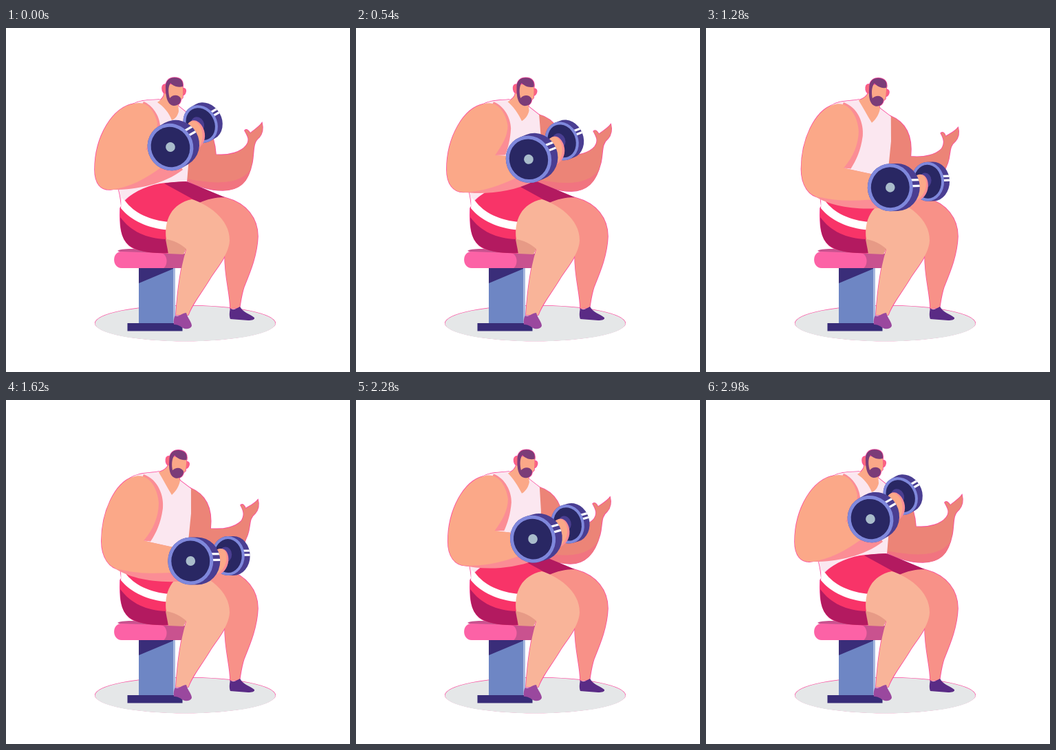
Animation, 500 px wide and 500 px high, one loop 3000 ms. Source, as an HTML page with a canvas:

```html
<!DOCTYPE html>
<html lang="en">
<head>
<meta charset="utf-8">
<title>Dumbbell curl</title>
<style>
html, body { margin: 0; width: 100%; height: 100%; overflow: hidden; background: #fff; }
canvas { display: block; width: 500px; height: 500px; }
</style>
</head>
<body>
<canvas id="stage" width="500" height="500"></canvas>
<script>
const ctx = document.getElementById('stage').getContext('2d');
const LOOP = 3000, STEP = 20;
const FRINGE = '#fb4a9d';

const SKIN = '#fba888', BLUSH = '#fb8d95', PINK = '#f83468', WINE = '#b31a60';
const SHIRT = '#fbe7f0', HAIR = '#7b3c78', EAR = '#f9667f';
const NAVY = '#292763', RIM = '#7f88dc', VIOLET = '#4a3e92';

// Still shapes
const still = {
  backLeg: 'M280 254 C298 245 310 244 320 247 C350 255 366 277 366 303 C365 330 355 354 346 376 C342 388 341 398 339.5 407 L326 408 C326 385 318 365 318 330 L290 290 Z',
  backShoe: 'M326 407 C330 412 336 407 340 405 C345 414 354 415 361 421 C362 424 357 425 352 425 L326 423 C324 418 325 412 326 407 Z',
  frontLeg: 'M270 249 C291 255 326 277 325 309 C324 329 306 349 296 365 C282 388 270 402 265 417 L247 417 C249 385 253 350 262 322 C252 315 243 311 233 308 C229 279 241 255 270 249 Z',
  thighShade: 'M232 307 C243 308 254 314 262 321 L258 329 L236 328 Z',
  frontShoe: 'M246 418 C251 421 256 414 262 414 C264 422 270 427 270 433 C268 438 261 438 257 436 C252 432 248 431 244 431 C243 426 244 421 246 418 Z',
  shorts: 'M173 251 C187 236 210 227 232 225 L262 223 L282 252 L240 300 L237 327 C212 328 190 325 179 316 C167 305 165 286 166 262 Z',
  shortsFar: 'M230 226 C242 224 252 223 264 223.5 L318 246 C304 246 292 249 281 254 Z',
  shortsLow: 'M166 275 C182 296 204 306 233 307 L236 327 C212 328 190 325 179 316 C167 306 166 291 166 275 Z',
  band: 'M168 247 L173 251 C186 269 210 280 238 282 L235 293.5 C206 291 182 280 167 262 Z'
};
for (const k in still) still[k] = new Path2D(still[k]);

// Moving shapes: arm raised, arm lowered
const moving = {
  shirt: [
    'M184 111 C196 104 210 105 222 104 L250 113 L265 125 L269 160 L265 200 L263 224 C230 224 193 230 172 251 L168 260 C167 251 166 243 164 236 L180 180 Z',
    'M180 114 C192 105 208 107 222 104 L253 117 L269 129 L269 165 L265 205 L263 224 C230 224 193 230 172 251 L168 260 C167 251 166 245 165 240 L180 180 Z'],
  neck: [
    'M230 94 C230 101 225 105 220 108 C229 114 237 123 241 134 C247 132 250 126 251 121 L250 108 Z',
    'M236 94 C234 100 228 103 222 105 C228 115 234 127 241 138 C248 132 252 124 253 117 L250 108 Z'],
  farArm: [
    'M264 125 C288 130 303 150 305 184 C325 186 342 180 349 171 C355 163 352 158 347 149 C350 146 353 150 355 153 C362 147 368 144 372 138 C374 146 373 153 368 159 C358 167 361 178 358 195 C352 225 338 236 315 236 C295 236 275 229 262 221 Z',
    'M268 128 C292 138 300 160 297 187 C318 189 334 184 342 176 C347 168 346 162 341 153 C344 150 347 154 348 158 C356 153 361 151 366 145 C368 152 367 159 362 165 C352 173 356 182 351 196 C341 222 328 240 308 240 C290 240 275 232 262 224 Z'],
  farShade: [
    'M262 219 C302 227 342 229 356 204 C351 226 338 236 315 236 C295 236 275 229 262 221 Z',
    'M262 222 C298 231 335 230 349 202 C341 222 328 240 308 240 C290 240 275 232 262 224 Z'],
  armShade: [
    'M200 107 C213 112 223 128 224 141 C224 155 222 166 220 176 L203 177 L235 175 L257 206 C228 228 188 236 149 235 L140 225 Z',
    'M200 108 C222 116 230 140 228 158 C225 180 218 194 210 206 L200 205 L258 218 L263 264 C215 268 180 259 160 246 L150 230 Z'],
  arm: [
    'M186 110 C156 114 129 157 129 206 C129 226 138 236 152 235 C180 232 203 219 225 203 L235 175 L203 177 C212 162 220 152 220 138 C216 120 205 105 186 110 Z',
    'M184 112 C158 121 139 163 139 205 C139 228 150 246 168 247 C195 254 228 253 262 250 L258 218 L200 205 C214 189 222 170 222 150 C221 130 208 103 184 112 Z']
};
const NUM = /\d+(\.\d+)?/g;

function blend([a, b], p) {
  const to = b.match(NUM);
  let i = 0;
  return new Path2D(a.replace(NUM, v => +v + (to[i++] - v) * p));
}

// Head parts, drawn upright and tilted as one group
const head = [
  [EAR, 'M233 83 C230 81 227 83 227 87 C227 91 229 95 233 96 Z'],
  [EAR, 'M256 89 C259 86 262 89 261 93 C260 97 258 98 256 97 Z'],
  [SKIN, 'M234 82 L257 82 L257 101 L248 111 L237 107 Z'],
  [HAIR, 'M232 88 C231 76 238 72 245 72 C254 72 258 77 257 85 C249 87 243 84 239 80 C235 86 236 95 238 102 C242 97 250 96 254 102 C255 109 250 113 244 113 C235 112 232 101 232 88 Z']
].map(([c, d]) => [c, new Path2D(d)]);

function fill(color, path) {
  ctx.fillStyle = color;
  ctx.fill(path);
}

function oval(color, x, y, rx, ry) {
  const path = new Path2D();
  path.ellipse(x, y, rx, ry, 0, 0, Math.PI * 2);
  fill(color, path);
}

function rect(color, x, y, w, h) {
  ctx.fillStyle = color;
  ctx.fillRect(x, y, w, h);
}

function fringe(path) {
  ctx.strokeStyle = FRINGE;
  ctx.lineWidth = 1.6;
  ctx.stroke(path);
}

function tilted(p, draw) {
  ctx.save();
  ctx.translate(238, 148);
  ctx.rotate(0.09 * p);
  ctx.translate(-238, -148);
  draw();
  ctx.restore();
}

function bench() {
  rect('#6e86c4', 193, 348, 50, 82);
  rect('#a9b9e0', 243, 348, 3, 82);
  fill('#3a2d79', new Path2D('M193 348 L243 348 L243 350 L193 371 Z'));
  rect('#382c78', 176.5, 429, 80, 11.5);
  fill('#c9528f', new Path2D('M162 324 C166 321 176 321 186 321 L230 328 L262 328 L256 349 L225 349 Z'));
  fill('#fc62a6', new Path2D('M168 325 L226 327 C236 330 235 345 229 349 L168 349 C154 349 153 325 168 325 Z'));
}

// One weight disc with its thick edge to the right
function disc(x, y, rx, ry, depth, rim, marks) {
  ctx.save();
  ctx.translate(x, y);
  const side = new Path2D();
  side.ellipse(0, 0, rx, ry, 0, 0, Math.PI * 2);
  side.rect(0, -ry, depth, ry * 2);
  side.ellipse(depth, 0, rx, ry, 0, 0, Math.PI * 2);
  fill(VIOLET, side);
  ctx.save();
  ctx.clip(side);
  for (const m of marks) rect('#fff', 0, m - 1.6, 60, 3.2);
  ctx.restore();
  oval(RIM, 0, 0, rx, ry);
  oval(NAVY, 0, 0, rx - rim, ry - rim);
  ctx.restore();
}

function dumbbell(p) {
  ctx.save();
  ctx.translate(239 + 46.5 * p - 17 * p * p, 173 + 62 * p);
  ctx.rotate(-Math.PI / 6 * (1 - p));
  disc(54.5, -7, 24, 28.5, 8, 4, [-7.3, -1.2]);
  oval(VIOLET, 51, -9, 9, 11);
  fill(BLUSH, new Path2D('M38 -16 C50 -22 56 -11 55 0 C54 11 47 20 35 22 Z'));
  fill(SKIN, new Path2D('M38 -16 C49 -21 54 -11 52 0 C50 10 44 17 35 21 Z'));
  disc(0, 0, 33, 34.5, 10, 5, [-10, -1.2]);
  oval('#a9bccb', 0, 0, 6.8, 7);
  ctx.restore();
}

function draw(p) {
  const m = {};
  for (const k in moving) m[k] = blend(moving[k], p);

  rect('#fff', 0, 0, 500, 500);
  oval(FRINGE, 260.5, 429, 131.5, 26.2);
  oval('#e5e7e8', 260.5, 429.5, 131, 26);

  [still.backLeg, still.frontLeg, still.shorts, m.farArm, m.shirt, m.neck, m.arm].forEach(fringe);
  tilted(p, () => head.forEach(([, d]) => fringe(d)));

  bench();
  fill('#f89188', still.backLeg);
  fill('#5a2b85', still.backShoe);
  fill('#ec8477', m.farArm);
  fill('#f17480', m.farShade);
  fill(SHIRT, m.shirt);
  fill(PINK, still.shorts);
  fill(WINE, still.shortsFar);
  fill(WINE, still.shortsLow);
  fill('#fff', still.band);
  fill('#f9b499', still.frontLeg);
  fill('#e79a86', still.thighShade);
  fill('#9a489e', still.frontShoe);
  fill(SKIN, m.neck);
  tilted(p, () => head.forEach(([c, d]) => fill(c, d)));
  fill(BLUSH, m.armShade);
  fill(SKIN, m.arm);
  dumbbell(p);
}

function tick() {
  const t = Math.floor(performance.now() % LOOP / STEP) * STEP;
  draw((1 - Math.cos(t / LOOP * Math.PI * 2)) / 2);
  requestAnimationFrame(tick);
}
tick();
</script>
</body>
</html>
```
